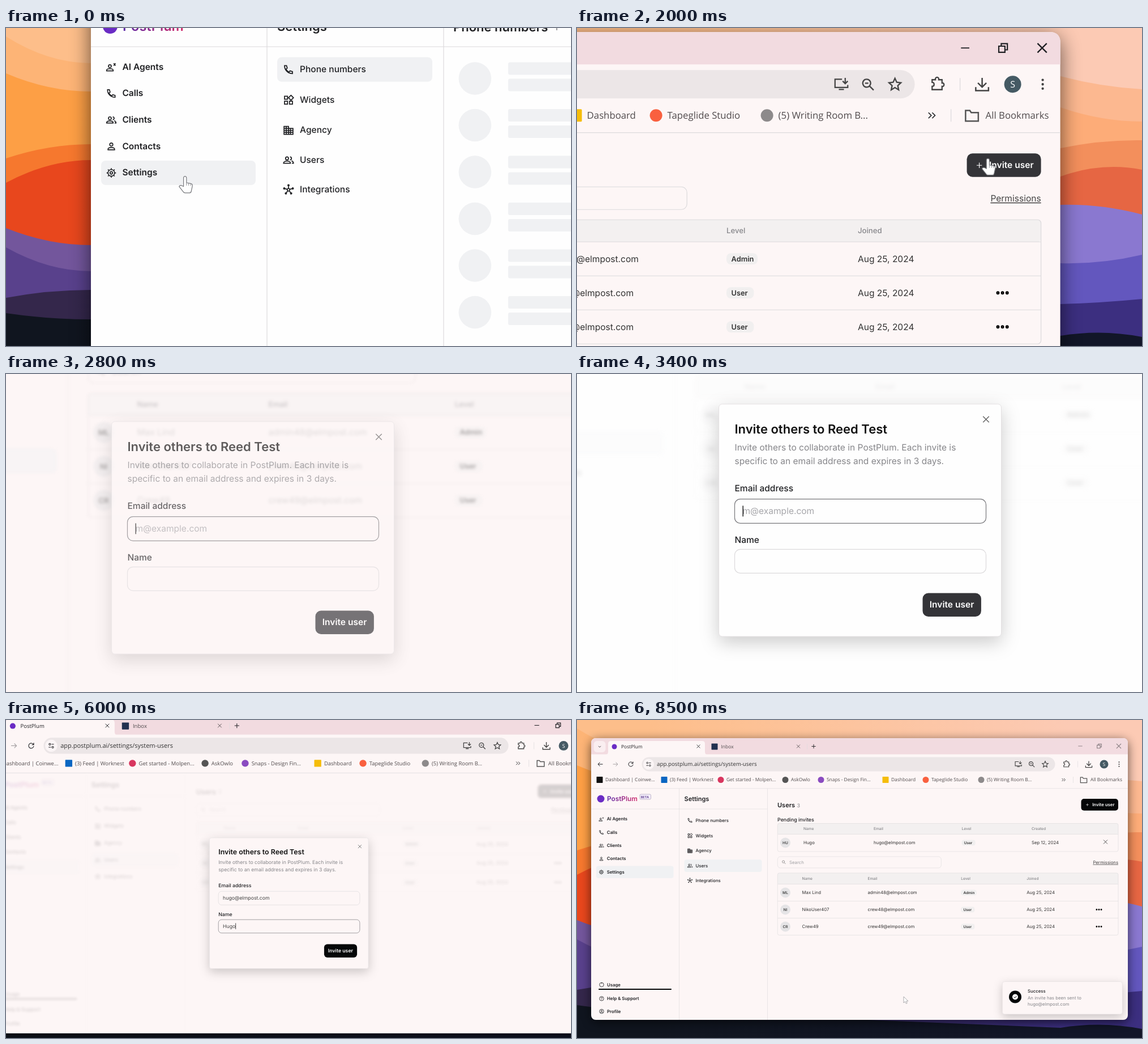
Write an HTML page that moves like this. It is 998 px wide and 561 px high and loops after 8700 ms.

```html
<!DOCTYPE html>
<html lang="en">
<head>
<meta charset="utf-8">
<title>Invite a user</title>
<style>
html, body { margin: 0; width: 100%; height: 100%; overflow: hidden; background: #10151f; }
svg { display: block; width: 100%; height: 100%; --bg: #fff; }
text { font-family: Inter, sans-serif; white-space: pre; text-rendering: geometricPrecision; }
.chrome text { font-family: "Open Sans", sans-serif; }
.bg { fill: var(--bg); }
.line { fill: none; stroke: #dcdadc; stroke-width: .6; }
.icon { fill: none; stroke: currentColor; stroke-width: 2; }
#shadow { filter: blur(9px); }
#modal, #toast { filter: drop-shadow(0 5px 8px #0003); }
</style>
</head>
<body>
<svg id="stage" viewBox="0 0 998 561" preserveAspectRatio="none"></svg>
<script>
const LOOP = 8700;
const SM = 7.77, XS = 6.6;
const INK = '#202124', GREY = '#86868a', BLACK = '#050708', HOVER = '#343438';
const DOMAIN = '@elmpost.com';

// ---- drawing helpers; y is the middle of a line of text ----
const text = (x, y, s, size = SM, weight = 500, fill = INK, extra = '') =>
  `<text x="${x}" y="${y + size * .35}" font-size="${size}" font-weight="${weight}" fill="${fill}" ${extra}>${s}</text>`;
const rect = (x, y, w, h, r, attrs) => `<rect x="${x}" y="${y}" width="${w}" height="${h}" rx="${r}" ${attrs}/>`;
const fill = c => `fill="${c}"`;
const circle = (x, y, r, c) => `<circle cx="${x}" cy="${y}" r="${r}" fill="${c}"/>`;
const line = d => `<path class="line" d="${d}"/>`;
const group = (id, content, attrs = '') => `<g id="${id}" ${attrs}>${content}</g>`;
const range = n => [...Array(n).keys()];
const disc = (x, y, r) => `M${x - r} ${y}a${r} ${r} 0 1 0 ${2 * r} 0a${r} ${r} 0 1 0 ${-2 * r} 0z`;
const spokes = (n, from, to) => range(n).map(i => {
  const a = i / n * 2 * Math.PI - Math.PI / 2, c = Math.cos(a), s = Math.sin(a);
  return `M${12 + from * c} ${12 + from * s}L${12 + to * c} ${12 + to * s}`;
}).join('');

// Icons on a 24 unit grid
const icons = {
  phone: 'M4 4h4l1.500 5-2.500 2c1.500 3 3 4.500 6 6l2-2.500 5 1.500v4C11 20 4 13 4 4z',
  agent: disc(9, 10, 3) + 'M2 20v-1c0-5 14-5 14 0v1zM17 4l4 5M21 4l-4 5',
  person: disc(12, 8, 3.3) + 'M5 19v-1c0-5 14-5 14 0v1z',
  people: disc(9, 8, 3) + 'M2 18c0-6 14-6 14 0zM15 5c4 0 4 6 0 6M18 13c3 1 4 3 4 5h-3',
  widgets: 'M4 4h6v6H4zM4 14h6v6H4zM14 14h6v6h-6zM17 2l5 5-5 5-5-5z',
  building: 'M3 4h9v16H3zM12 8h9v12h-9M3 8h9M3 12h18M3 16h18M7.500 4v16M16 8v12',
  hub: spokes(5, 2, 9) + disc(12, 12, 2.500) + range(5).map(i => {
    const a = i / 5 * 2 * Math.PI - Math.PI / 2;
    return disc(12 + 9 * Math.cos(a), 12 + 9 * Math.sin(a), 1.300);
  }).join(''),
  gear: disc(12, 12, 7) + disc(12, 12, 2.700) + spokes(8, 7, 10),
  usage: disc(12, 12, 9) + 'M12 3v5',
  help: disc(12, 12, 9) + 'M9 10c0-4 6-4 6-1 0 2-3 2-3 5M12 16v2',
  profile: disc(12, 12, 9) + disc(12, 9.500, 2.500) + 'M6 18c2-4 10-4 12 0',
  search: disc(9.500, 9.500, 5.500) + 'M14 14l6 6',
  zoom: disc(9.500, 9.500, 6) + 'M14 14l6 6M7 9.500h5',
  cross: 'M5 5l14 14M19 5L5 19',
  plus: 'M12 4v16M4 12h16',
  minus: 'M4 12h16',
  restore: 'M5 9h10v10H5zM9 9V5h10v10h-4',
  down: 'M6 9l6 6 6-6',
  back: 'M21 12H4M11 5l-7 7 7 7',
  forward: 'M3 12h17M13 5l7 7-7 7',
  reload: 'M19 8a8 8 0 1 0 1 5M20 3v6h-6',
  tune: disc(7, 7, 3) + disc(17, 17, 3) + 'M13 7h8M3 17h8',
  install: 'M13 4H2v13h20v-4M8 20h8M18 2v9M14 7l4 4 4-4',
  star: 'M12 3l2.700 6 6.300.7-4.700 4.300 1.300 6.500L12 17l-5.600 3.500 1.300-6.500L3 9.700 9.300 9z',
  puzzle: 'M4 6h5c-1-5 6-5 5 0h5v5c4-1 4 6 0 5v5H4v-5c4 0 4-6 0-6z',
  download: 'M12 3v12M6 10l6 6 6-6M3 16v5h18v-5',
  kebab: disc(12, 5, 1) + disc(12, 12, 1) + disc(12, 19, 1),
  folder: 'M3 5h6l2 3h10v12H3z',
  more: 'M5 6l6 6-6 6M13 6l6 6-6 6',
  dots: disc(5, 12, 1.500) + disc(12, 12, 1.500) + disc(19, 12, 1.500),
};
const icon = (name, x, y, size = 10, color = INK) =>
  `<path class="icon" color="${color}" transform="translate(${x - size / 2} ${y - size / 2}) scale(${size / 24})" d="${icons[name]}"/>`;

// ---- wallpaper: [left colour, right colour, heights from left to right] ----
const waves = [
  ['#fdbe8a', '#fccab4', 0, 0, 0, 0, 0],
  ['#fdb476', '#fcb890', 15, 62, 85, 104, 108],
  ['#fd9f45', '#fdac78', 80, 112, 140, 165, 165],
  ['#f6782e', '#f38f5c', 230, 205, 212, 197, 198],
  ['#e8471d', '#e66643', 273, 233, 262, 236, 250],
  ['#73569c', '#8a78d0', 353, 383, 312, 310, 329],
  ['#59418c', '#6357be', 387, 429, 415, 417, 400],
  ['#34274b', '#3c2f80', 476, 462, 487, 485, 478],
  ['#10151f', '#121628', 503, 514, 543, 531, 545],
];
const wallpaper = waves.map(([left, right, a, b, c, d, e], i) => `
  <linearGradient id="wave${i}" gradientUnits="userSpaceOnUse" x1="120" x2="870">
    <stop stop-color="${left}"/><stop offset="1" stop-color="${right}"/></linearGradient>
  <path fill="url(#wave${i})" d="M0 ${a}Q75 ${b} 150 ${b}L854 ${c}Q926 ${d} 998 ${e}V561H0z"/>`).join('');

// ---- browser frame ----
const bookmarks = [
  [40, 'Dashboard | Coinwe...', '#111', 1], [154, '(3) Feed | Worknest', '#0a66c2', 1],
  [254, 'Get started - Molpen...', '#d8365f'], [368, 'AskOwlo', '#555'],
  [431, 'Snaps - Design Fin...', '#8a4bc0'], [545, 'Dashboard', '#f5bd0b', 1],
  [616, 'Tapeglide Studio', '#f9603f'], [714, '(5) Writing Room B...', '#8d8a8b'],
];
const mark = (x, y, r, color, square) =>
  square ? rect(x - r, y - r, 2 * r, 2 * r, .8, fill(color)) : circle(x, y, r, color);
const SOFT = '#514c4e';
const chrome = `<g class="chrome">
  <path fill="#f2dbe0" d="M25 60.500V41q0-9 9-9H964q9 0 9 9v19.500z"/>
  <path class="bg" d="M51 61q4 0 4-5V42q0-5 5-5H221q5 0 5 5v14q0 5 4 5z"/>
  ${rect(29.5, 37, 21, 20, 6, fill('#faeef0'))}${icon('down', 40, 47, 9)}
  ${mark(66, 47, 4.5, '#6a2cc4')}${text(78, 47, 'PostPlum', 8.5, 400)}${icon('cross', 214.5, 46.5, 10)}
  ${mark(243, 47, 5.5, '#22304f', 1)}${text(254.5, 47, 'Inbox', 8.5, 400, SOFT)}${icon('cross', 391, 46.5, 10, SOFT)}
  ${line('M406.500 42v10')}${icon('plus', 418, 46.5, 11)}
  ${group('controls', icon('minus', 889, 46, 11) + icon('restore', 922.5, 46, 13) + icon('cross', 957, 46, 14))}
  ${icon('back', 41, 78, 12)}${icon('forward', 68, 78, 12, '#a5a0a2')}${icon('reload', 95, 78, 12)}
  ${rect(114.5, 65.5, 730, 25, 12.5, fill('#ece6e7'))}
  ${circle(126.5, 78, 9.5, '#fbf5f6')}${icon('tune', 126.5, 78, 11)}
  ${text(141, 78, 'app.postplum.ai/settings/system-users', 9.76, 400, '#333')}
  ${icon('install', 779.7, 78, 13.5, '#444')}${icon('zoom', 803.5, 78.5, 14, '#444')}${icon('star', 827, 78, 14, '#444')}
  ${icon('puzzle', 864.5, 77.5, 14, '#444')}${line('M884.500 72.500v11')}${icon('download', 904, 78, 15, '#444')}
  ${circle(931, 78, 7.5, '#455a64')}${text(931, 78, 'S', 8, 400, '#fff', 'text-anchor="middle"')}
  ${icon('kebab', 957.5, 78, 13, '#444')}
  ${bookmarks.map(([x, name, color, square]) => mark(x, 105.5, 5.5, color, square) + text(x + 10, 105.5, name, 8.4, 400, SOFT)).join('')}
  ${icon('more', 859.5, 105.5, 10)}${line('M876.500 100v11')}${icon('folder', 895, 105.5, 15, '#555')}
  ${text(907, 105.5, 'All Bookmarks', 8.4, 400, SOFT)}
  ${line('M25 120.700H973')}</g>`;

// ---- application page ----
const nav = [['agent', 'AI Agents', 174.7], ['phone', 'Calls', 198], ['people', 'Clients', 221.5],
  ['person', 'Contacts', 244.7], ['gear', 'Settings', 268]];
const footer = [['usage', 'Usage', 467], ['help', 'Help &amp; Support', 491.5], ['profile', 'Profile', 514]];
const sections = [['phone', 'Phone numbers', 177], ['widgets', 'Widgets', 204], ['building', 'Agency', 230.6],
  ['people', 'Users', 257], ['hub', 'Integrations', 283]];
const sidebar = `
  ${line('M180.500 121V529M336.500 121V529M25 157H336.500')}
  ${circle(42, 139, 6.5, '#6a2cc4')}${text(53, 139, 'PostPlum', 11.8, 600, 'url(#brand)')}
  ${rect(111, 131, 19.5, 9, 2, 'fill="#f4eefb" stroke="#8a7f9c" stroke-width=".5"')}${text(112.7, 135.6, 'BETA', 5.6, 600, '#5b3a8c')}
  ${rect(34, 257.5, 136.5, 21.5, 4, fill('#f0f1f3'))}
  ${nav.map(([name, label, y]) => icon(name, 43, y + .3) + text(52.7, y, label, SM, 600)).join('')}
  ${footer.map(([name, label, y]) => icon(name, 43.5, y) + text(53, y, label, SM, 600)).join('')}
  ${rect(38, 474, 129, 2, 1, fill(BLACK))}
  ${text(189.5, 139, 'Settings', 11, 600)}
  ${rect(189.5, 166, 137, 21.7, 4, `id="selected" ${fill('#f0f1f3')}`)}
  ${sections.map(([name, label, y]) => icon(name, 199.5, y + .2, 10.5) + text(209.5, y - .2, label)).join('')}`;

const BONE = fill('#f0f1f3');
const phonePage = line('M336.500 157H973') + text(345, 139.5, 'Phone numbers', 11, 600) + text(434, 139.5, '1', 8.9, 400, GREY) +
  range(6).map(i => {
    const y = 185 + i * 41.25;
    return circle(364.2, y, 14.4, '#f0f1f3') + rect(393.5, y - 14.2, 130, 11, 1.5, BONE) + rect(393.5, y + .2, 90, 11, 1.5, BONE);
  }).join('');

const pill = (x, y, label) =>
  rect(x, y - 5, label.length * 3.3 + 11, 10, 4, fill('#f1efef')) + text(x + 4.3, y, label, 6.4, 600, '#333');
const avatar = (y, initials) => circle(368, y, 9, '#e5e4e6') + text(368, y, initials, XS, 600, '#444', 'text-anchor="middle"');
const row = (y, columns, [initials, name, mail, level, date]) => avatar(y, initials) +
  [name, mail, '', date].map((s, i) => s && text(columns[i], y, s, SM, 400, '#333')).join('') + pill(columns[2], y, level);
const table = (top, bottom, header, columns, labels) =>
  rect(354.3, top, 601.7, header - top, 3, fill('#f3f0f0')) + rect(354.3, top, 601.7, bottom - top, 3, 'class="line"') +
  line(`M354.300 ${header}H956`) + labels.map((s, i) => text(columns[i], (top + header) / 2, s, XS, 500, GREY)).join('');

const memberColumns = [397.5, 513.5, 678.2, 794.2], inviteColumns = [400, 524, 679.5, 803];
const members = [
  ['ML', 'Max Lind', 'admin48' + DOMAIN, 'Admin', 'Aug 25, 2024'],
  ['NI', 'NikoUser407', 'crew48' + DOMAIN, 'User', 'Aug 25, 2024'],
  ['CR', 'Crew49', 'crew49' + DOMAIN, 'User', 'Aug 25, 2024'],
];
const memberTable = table(270, 379.5, 289.5, memberColumns, ['Name', 'Email', 'Level', 'Joined']) +
  line('M354.300 319.500H956M354.300 349.500H956') +
  members.map((m, i) => row(304.5 + i * 30, memberColumns, m) + (i ? icon('dots', 922, 304.5 + i * 30, 14, '#000') : '')).join('') +
  icon('search', 365.5, 251, 9, '#777');
const skeleton = rect(354.3, 271, 601.7, 300, 4, 'class="line"') +
  range(8).map(i => rect(363.5, 280 + i * 26.8, 583, 18, 2, BONE)).join('');
const pending = text(354, 176, 'Pending invites', 8.88) +
  table(182.5, 232, 201.5, inviteColumns, ['Name', 'Email', 'Level', 'Created']) +
  row(216.5, inviteColumns, ['HU', 'Hugo', 'hugo' + DOMAIN, 'User', 'Sep 12, 2024']) + icon('cross', 933.5, 215, 12, '#555');
const usersPage = text(354, 150, 'Users', 11, 600) + text(388.5, 150.5, '', 8.9, 400, GREY, 'id="count"') +
  rect(890.5, 139, 65.5, 20.7, 5, 'id="invite"') + icon('plus', 901.5, 149.5, 7, '#fff') +
  text(949.5, 149.2, 'Invite user', SM, 600, '#fff', 'text-anchor="end"') + group('pending', pending) +
  group('list', rect(354.3, 241, 289, 20, 5, 'class="line"') + text(375, 251, 'Search', SM, 400, '#a0a0a4') +
    text(956, 251, 'Permissions', SM, 400, '#444', 'text-anchor="end" text-decoration="underline"') +
    group('members', memberTable) + group('skeleton', skeleton));

// ---- dialog, message, pointer ----
const modal = rect(375, 222.5, 249.5, 205, 3, 'class="bg" stroke="#e4e0e2" stroke-width=".5"') +
  icon('cross', 611, 236, 9, '#666') + text(389, 244.6, 'Invite others to Reed Test', 11, 600, '#111') +
  text(389, 260.7, 'Invite others to collaborate in PostPlum. Each invite is', SM, 400, GREY) +
  text(389, 272.7, 'specific to an email address and expires in 3 days.', SM, 400, GREY) +
  text(389, 297, 'Email address') + text(389, 342.5, 'Name') +
  rect(389, 306.3, 222, 21.4, 5, 'id="mailBox" class="line"') + text(396, 317, '', SM, 400, '', 'id="mail"') +
  rect(389, 350.7, 222, 21, 5, 'id="nameBox" class="line"') + text(396, 361, '', SM, 400, '#444', 'id="name"') +
  rect(0, 0, .7, 9.5, 0, 'id="caret" fill="#111"') +
  rect(555, 389.3, 51.7, 20.7, 5, 'id="send"') + text(580.8, 399.5, 'Invite user', SM, 600, '#fff', 'text-anchor="middle"');
const toast = rect(751.3, 461.5, 212, 57.5, 4, 'class="bg" stroke="#e2dddf" stroke-width=".6"') +
  circle(774, 488.5, 11, BLACK) + circle(774, 488.5, 5, '#fff') +
  '<path d="M771.700 488.500l1.700 1.800 3-3.300" fill="none" stroke="#050708"/>' +
  text(796, 478.3, 'Success') + text(796, 490.2, 'An invite has been sent to', SM, 400, GREY) + text(796, 501.3, 'hugo' + DOMAIN, SM, 400, GREY);
const outline = 'fill="#fff" stroke="#77787c" stroke-width=".6" stroke-linejoin="round"';
const pointer = group('hand', `<path ${outline} d="M-1.200 1.200c0-1.800 2.600-1.800 2.600 0v4.300l3.700.7c1.300.3 1.700 1 1.500 2.200l-1 4.600c-.2 1-.6 1.400-1.400 1.400H.2c-.8 0-1.300-.4-1.700-1l-3.600-4.600c.6-1.300 1.800-1.400 3.900 0z"/><path d="M1.400 5.500v2.500M3.300 6v2M5.100 6.400v1.800" stroke="#909196" stroke-width=".5"/>`) +
  group('arrow', `<path ${outline} d="M0 0v11l2.700-2.400 1.600 3.700 1.900-.8-1.600-3.600h3.400z"/>`);

stage.innerHTML = `<defs><linearGradient id="brand"><stop stop-color="#5a2aa8"/><stop offset="1" stop-color="#d22b6c"/></linearGradient></defs>
  ${wallpaper}` + group('camera',
    rect(25, 36, 948, 497, 10, 'id="shadow" fill="#000" opacity=".6"') + rect(25, 32, 948, 497, 8, 'class="bg"') + chrome +
    group('page', sidebar + group('phonePage', phonePage) + group('usersPage', usersPage)) +
    group('modal', modal) + group('toast', toast) + group('pointer', pointer));

// ---- timing ----
const el = id => document.getElementById(id);
const ramp = (t, from, to) => Math.min(1, Math.max(0, (t - from) / (to - from)));
const ease = p => p < .5 ? 16 * p ** 5 : 1 - 16 * (1 - p) ** 5;
const glide = p => p * p * (3 - 2 * p);
const between = (t, from, to) => t >= from && t < to;
const show = (id, on) => { el(id).style.display = on ? '' : 'none'; };
const set = (id, attrs) => { for (const k in attrs) el(id).setAttribute(k, attrs[k]); };

// [start, duration, scale, x, y]
const cameraMoves = [[1200, 900, 2, -1092.7, -56.7], [2150, 1030, 2, -499.5, -392], [5150, 1370, 1, 0, 0]];
function cameraAt(t) {
  let scale = 2, x = 100, y = -281;
  for (const [start, length, s2, x2, y2] of cameraMoves) {
    const rest = 1 - ease(ramp(t, start, start + length));
    scale = s2 + (scale - s2) * rest;
    x = x2 + (x - x2) * rest;
    y = y2 + (y - y2) * rest ** 1.07;
  }
  return `translate(${x} ${y}) scale(${scale})`;
}

// [start, end, x, y]
const pointerMoves = [[50, 850, 219, 252.3], [1250, 1950, 909, 143.7], [6700, 6701, 520, 366], [6800, 7200, 578, 398], [7300, 7700, 577, 488]];
function pointerAt(t) {
  let x = 108, y = 271.5;
  for (const [start, end, x2, y2] of pointerMoves) {
    const p = glide(ramp(t, start, end));
    x += (x2 - x) * p;
    y += (y2 - y) * p;
  }
  return `translate(${x} ${y})`;
}

function draw(t) {
  const onUsers = t >= 750, loaded = t >= 1500, invited = t >= 8200;
  const dialog = ramp(t, 2600, 2900) - ramp(t, 7750, 8000);
  const mailFilled = t >= 4100, onName = t >= 5000;

  stage.style.setProperty('--bg', t < 1400 || between(t, 2950, 5300) ? '#fefefe' : '#fdf6f6');
  set('camera', { transform: cameraAt(t) });
  set('controls', { opacity: invited ? .5 : 1 });
  set('selected', { y: onUsers ? 246.2 : 166.2 });
  show('phonePage', !onUsers);
  show('usersPage', onUsers);
  show('members', loaded);
  show('skeleton', !loaded);
  show('pending', invited);
  set('list', { transform: `translate(0 ${invited ? 0 : -72.5})` });
  el('count').textContent = loaded ? 3 : 0;
  set('invite', { fill: between(t, 1800, 2700) ? HOVER : BLACK });
  el('page').style.filter = dialog ? `blur(${1.8 * dialog}px)` : 'none';
  set('page', { opacity: 1 - .84 * dialog });

  show('modal', dialog > 0);
  set('modal', { opacity: dialog });
  el('mail').textContent = mailFilled ? 'hugo' + DOMAIN : 'm@example.com';
  set('mail', { fill: mailFilled ? '#444' : '#a6a6aa' });
  el('name').textContent = onName ? 'Hugo' : '';
  el('mailBox').style.stroke = onName ? '' : '#77777b';
  el('nameBox').style.stroke = onName ? '#77777b' : '';
  const typed = onName ? el('name') : el('mail');
  set('caret', {
    x: 396 + (dialog && mailFilled ? typed.getComputedTextLength() : 0),
    y: onName ? 356.2 : 312.2,
    opacity: between(t, 4500, 5000) ? 0 : 1,
  });
  set('send', { fill: t < 5300 ? HOVER : BLACK });

  show('toast', invited);
  set('toast', { opacity: ramp(t, 8100, 8300) });
  show('pointer', t < 2700 || t >= 6800);
  show('hand', t < 7300);
  show('arrow', t >= 7300);
  set('pointer', { transform: pointerAt(t) });
}

const start = performance.now();
function frame() {
  draw((performance.now() - start) % LOOP);
  requestAnimationFrame(frame);
}
frame();
</script>
</body>
</html>
```
